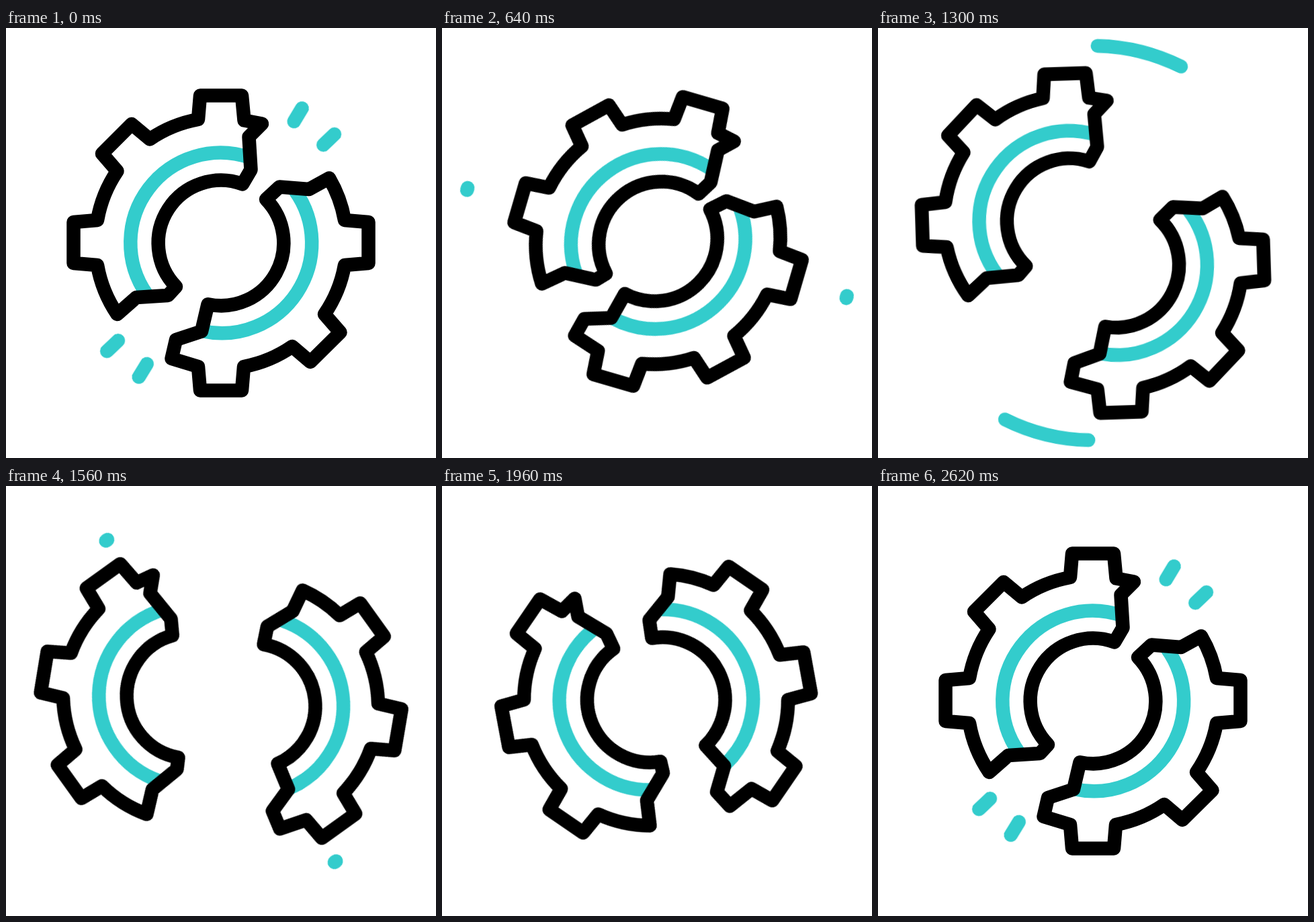
Write an HTML page that moves like this. It is 640 by 640 pixels and loops after 3000 ms.

```html
<!DOCTYPE html>
<html lang="en">
<head>
<meta charset="utf-8">
<title>Broken gear</title>
<style>
  @property --head { syntax: "<length>"; inherits: false; initial-value: 0px; }
  @property --tail { syntax: "<length>"; inherits: false; initial-value: 0px; }

  html, body { margin: 0; width: 100%; height: 100%; overflow: hidden; background: #fff; }
  svg { display: block; width: 100%; height: 100%; }

  path { fill: none; stroke: #000; stroke-width: 20.5; stroke-linecap: round; stroke-linejoin: round; }
  .teal { stroke: #33cccc; }
  .band { stroke-linecap: butt; }

  #spin, #left, #right, .trim {
    animation: 3000ms cubic-bezier(.333, 0, .667, 1) infinite;
  }
  #spin { transform-origin: 320px 320px; animation-name: spin; }
  #left { animation-name: left; }
  #right { animation-name: right; }

  /* Shows the stretch of a path between --tail and --head */
  .trim {
    stroke-dasharray: calc(var(--head) - var(--tail)) 2000px;
    stroke-dashoffset: calc(-1 * var(--tail));
  }
  .orbit {
    animation-name: orbit-head, orbit-tail, orbit-show;
    animation-timing-function: cubic-bezier(.333, 0, .667, 1), cubic-bezier(.333, 0, .667, 1), step-end;
  }
  .spark {
    animation-name: spark-head, spark-tail, spark-show;
    animation-timing-function: cubic-bezier(.333, 0, .667, 1), cubic-bezier(.333, 0, .667, 1), step-end;
  }

  @keyframes spin {
    0%, 6.667% { transform: rotate(0deg); }
    27%, 33.267% { transform: rotate(20deg); }
    62.267% { transform: rotate(-58deg); }
    87.333%, 100% { transform: rotate(0deg); }
  }
  @keyframes left {
    0%, 6.667% { transform: translate(0, 0); }
    25.333% { transform: translate(7.8px, .1px); animation-timing-function: cubic-bezier(.333, 0, .667, .558); }
    34.667% { transform: translate(-20.2px, -20.2px); animation-timing-function: cubic-bezier(.333, .546, .667, 1); }
    40.833%, 56.5% { transform: translate(-33.7px, -33.7px); }
    71.433% { transform: translate(12.1px, 3.7px); }
    87.333%, 100% { transform: translate(0, 0); }
  }
  @keyframes right {
    0%, 6.667% { transform: translate(0, 0); }
    25.333% { transform: translate(-6px, -6px); }
    40.833%, 56.5% { transform: translate(33.7px, 33.7px); }
    71.433% { transform: translate(-9.9px, -9.9px); }
    87.333%, 100% { transform: translate(0, 0); }
  }

  @keyframes orbit-head {
    0%, 20% { --head: 0px; }
    46.333%, 100% { --head: 461px; }
  }
  @keyframes orbit-tail {
    0%, 26.667% { --tail: 0px; }
    53.333%, 100% { --tail: 461px; }
  }
  @keyframes orbit-show {
    0% { opacity: 0; }
    20.333% { opacity: 1; }
    53.333%, 100% { opacity: 0; }
  }

  @keyframes spark-head {
    0%, 16% { --head: 52px; }
    73.333% { --head: 0px; }
    87.333%, 100% { --head: 52px; }
  }
  @keyframes spark-tail {
    0%, 6.667% { --tail: 29px; }
    16% { --tail: 52px; }
    73.333% { --tail: 0px; }
    87.333%, 100% { --tail: 29px; }
  }
  @keyframes spark-show {
    0% { opacity: 1; }
    16% { opacity: 0; }
    73.333%, 100% { opacity: 1; }
  }
</style>
</head>
<body>
<svg viewBox="0 0 640 640">
  <g id="spin">
    <g id="left">
      <path class="teal band" d="M363 193A134 134 0 0 0 209.5 396.5"/>
      <path d="M289 100.5H351L354.5 137.5 381 142.5 361.5 162 364.5 211 352 232.4
        A93.3 93.3 0 0 0 253 385L241 398 194 401 165.5 426
        A187.5 187.5 0 0 1 136 353L100.5 350V289L136 286
        A187.5 187.5 0 0 1 165.5 213L143 187 187 143 214 165.5
        A187.5 187.5 0 0 1 286 136Z"/>
    </g>
    <g id="right">
      <path class="teal band" d="M430 242A134 134 0 0 1 292 451"/>
      <path d="M481 223.5A187.5 187.5 0 0 1 504 286L539.5 289V350L504 353
        A187.5 187.5 0 0 1 474 426L497.5 453 453 497 426 474
        A187.5 187.5 0 0 1 354 504L351 539.5H289L286 504 246.5 492 253 464 291 451.5 300.5 411.2
        A93.3 93.3 0 0 0 387 255L407 236.5 451 240Z"/>
    </g>
    <g transform="translate(320 320)">
      <path class="teal trim orbit" d="M293.5 0A293.5 293.5 0 0 0 0 -293.5"/>
      <path class="teal trim orbit" d="M-293.5 0A293.5 293.5 0 0 0 0 293.5"/>
      <path class="teal trim spark" d="M182 0h52" transform="rotate(-59)"/>
      <path class="teal trim spark" d="M182 0h52" transform="rotate(-43.8)"/>
      <path class="teal trim spark" d="M182 0h52" transform="rotate(121.5)"/>
      <path class="teal trim spark" d="M182 0h52" transform="rotate(136.5)"/>
    </g>
  </g>
</svg>
</body>
</html>
```
